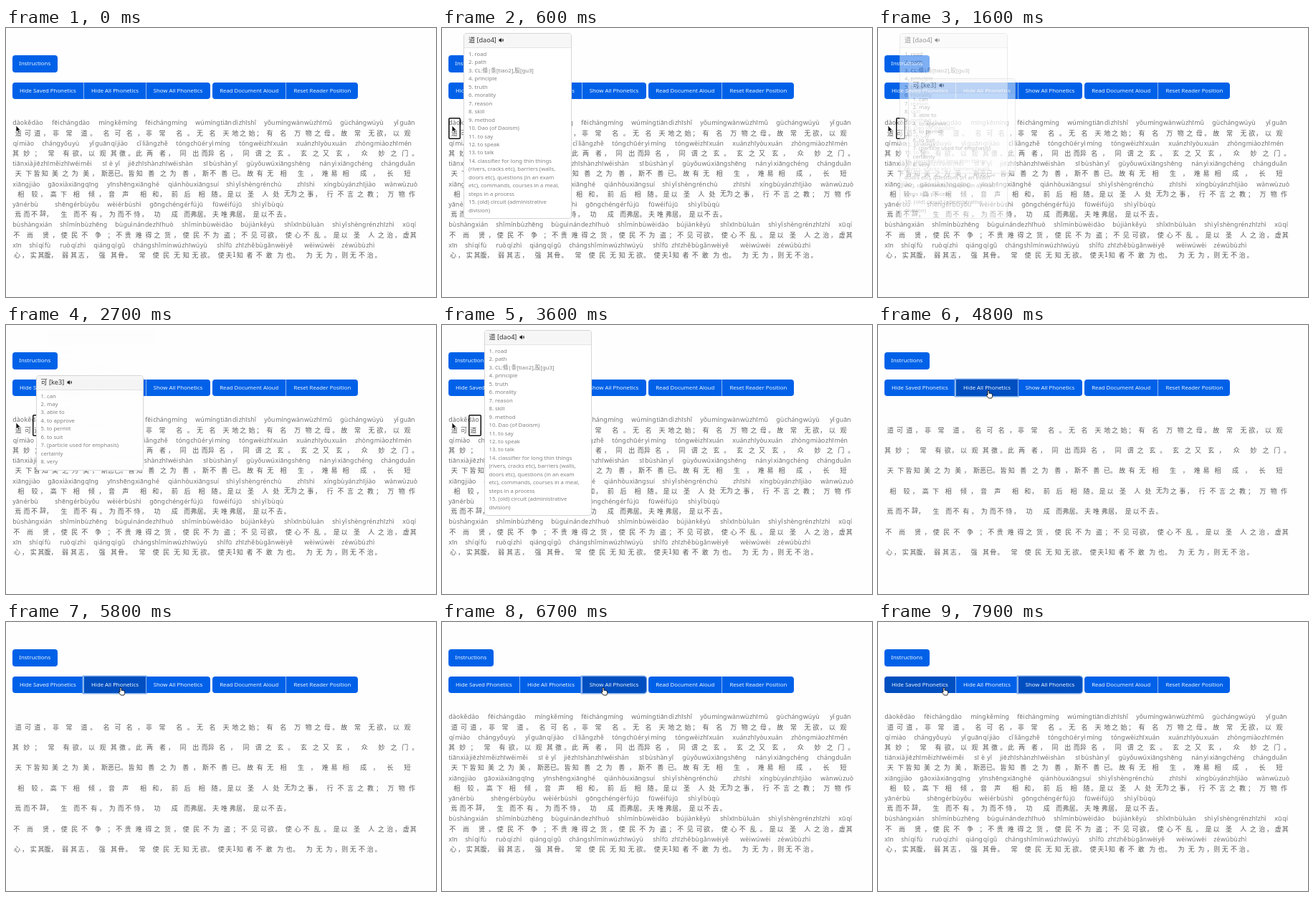
An HTML page for the animation above (8000 ms loop, 600x375 px).

```html
<!DOCTYPE html>
<html lang="zh-CN">
<head>
<meta charset="utf-8">
<title>Phonetic reader</title>
<style>
html, body { margin: 0; width: 100%; height: 100%; overflow: hidden; background: #fefefe; }
body { position: relative; font: 7.8px/1 "Noto Sans", sans-serif; color: #808080; }
#stage { position: absolute; left: 0; top: 0; width: 600px; height: 375px; overflow: hidden; }
#stage > * { position: absolute; }

.btn {
  box-sizing: border-box; top: 75.5px; height: 23.8px; line-height: 23.4px;
  text-align: center; white-space: nowrap; color: #f2f7ff; background: #0061e8;
}
.btn.first { border-radius: 4px 0 0 4px; }
.btn.last { border-radius: 0 4px 4px 0; }
.btn.next { border-left: 1px solid #8db8f5; }
#saved { animation: saved 8s step-end infinite; }
#hide { z-index: 1; animation: hide 8s step-end infinite; }
#show { z-index: 2; animation: show 8s step-end infinite; }

.phrase { display: flex; white-space: nowrap; }
.cell { box-sizing: border-box; min-width: 9px; text-align: center; }
.cell i, .cell span { display: block; height: 14.4px; line-height: 14px; }
.cell i { padding: 0 .3px; font-style: normal; font-size: 8.8px; color: #707070; animation: phonetics 8s step-end infinite; }
.cell span { font-family: "Noto Sans CJK SC", "Noto Sans CJK", "Noto Sans", sans-serif; font-size: 9px; color: #5a5a5a; }
.cell.plain span { transform: translateY(-1px); }

.mark {
  top: 125px; height: 29.5px; box-shadow: inset 0 0 0 1.5px #111; border-radius: 2px;
  opacity: 0; animation: mark 8s step-end infinite;
}
.pop {
  box-sizing: border-box; width: 150.5px; z-index: 5; overflow: hidden; background: #fff;
  border: 1px solid #d6d6d6; border-radius: 4px; opacity: 0; animation: pop 8s linear infinite;
}
.pop header {
  height: 19px; padding-left: 6px; font: 9.1px/18px "Noto Sans", "Noto Sans CJK SC", sans-serif;
  color: #333; background: #f6f6f6; border-bottom: 1px solid #e4e4e4;
}
.pop svg { width: 8px; height: 8px; margin-left: 1px; vertical-align: -1px; }
.pop pre {
  margin: 0; padding: 3px 6px 5px; font: 7.7px/11.45px "Noto Sans", "Noto Sans CJK SC", sans-serif;
}

#cursor { left: 0; top: 0; z-index: 9; width: 14px; height: 16px; overflow: visible; animation: move 8s ease-in-out infinite; }
#arrow { animation: arrow 8s step-end infinite; }
#hand { opacity: 0; animation: hand 8s step-end infinite; }

@keyframes pop { 0% { opacity: 0 } 2.5%, 15% { opacity: 1 } 17.5%, 100% { opacity: 0 } }
@keyframes mark { 0% { opacity: 1 } 15%, 100% { opacity: 0 } }
@keyframes phonetics { 0% { opacity: 1 } 58.75% { opacity: 0 } 81.25%, 100% { opacity: 1 } }
@keyframes move {
  0%, 50% { transform: translate(14px, 136px) }
  56.25%, 71.25% { transform: translate(154px, 91px) }
  77.5%, 90% { transform: translate(225px, 91px) }
  96.25%, 100% { transform: translate(92px, 91px) }
}
@keyframes arrow { 0% { opacity: 1 } 54.5%, 100% { opacity: 0 } }
@keyframes hand { 0% { opacity: 0 } 54.5%, 100% { opacity: 1 } }
@keyframes saved { 0% { background: #0061e8 } 94.6%, 100% { background: #004fc0 } }
@keyframes hide {
  0% { background: #0061e8; box-shadow: none }
  54.5% { background: #004fc0; box-shadow: none }
  58.75% { background: #004fc0; box-shadow: 0 0 0 1.5px #82aeea }
  81.25% { background: #0061e8; box-shadow: none }
  92.1% { background: #004fc0; box-shadow: none }
  94.6%, 100% { background: #0061e8; box-shadow: none }
}
@keyframes show {
  0% { background: #0061e8; box-shadow: none }
  74.7% { background: #004fc0; box-shadow: none }
  81.25%, 100% { background: #004fc0; box-shadow: 0 0 0 1.5px #82aeea }
}
</style>
</head>
<body>
<div id="stage">
  <div class="btn" style="left:8.7px;top:38px;width:63px;border-radius:4px">Instructions</div>
  <div class="btn first" id="saved" style="left:8.7px;width:99.3px">Hide Saved Phonetics</div>
  <div class="btn next" id="hide" style="left:108px;width:87px">Hide All Phonetics</div>
  <div class="btn next last" id="show" style="left:194.5px;width:90px">Show All Phonetics</div>
  <div class="btn first" style="left:287.7px;width:103px">Read Document Aloud</div>
  <div class="btn next last" style="left:390.3px;width:101px">Reset Reader Position</div>
  <svg id="cursor" viewBox="0 0 14 16">
    <path id="arrow" d="M0 0V9L2.1 7.2L3.6 10.5L5.1 9.8L3.6 6.6H6.3Z" fill="#111" stroke="#fff" stroke-width=".7"/>
    <path id="hand" d="M-1 1Q0 -1 1 1V4.4Q2 3.6 2.7 4.6Q3.7 4 4.3 5Q5.5 4.6 5.7 6V8.2L4.7 11H.3L-2.8 7Q-2.7 5.7 -1 6.8Z" fill="#fff" stroke="#111" stroke-width=".9" stroke-linejoin="round"/>
  </svg>
</div>
<script>
// One line per row; each phrase is "left characters syllables", "-" leaves a character without phonetics.
const rows = `
9 道可道， dào kě dào|64 非常道。 fēi cháng dào|129 名可名， míng kě míng|194 非常名。 fēi cháng míng|264 无名天地之始； wú míng tiān dì zhī shǐ|360 有名万物之母。 yǒu míng wàn wù zhī mǔ|466 故常无欲， gù cháng wú yù|540 以观 yǐ guān
9 其妙； qí miào|50 常有欲， cháng yǒu yù|115 以观其徼。 yǐ guān qí jiào|181 此两者， cǐ liǎng zhě|237 同出而异名， tóng chū ér yì míng|325 同谓之玄。 tóng wèi zhī xuán|405 玄之又玄， xuán zhī yòu xuán|487 众妙之门。 zhòng miào zhī mén
9 天下皆知美之为美， tiān xià jiē zhī měi zhī wéi měi|133 斯恶已。 sī è yǐ|170 皆知善之为善， jiē zhī shàn zhī wéi shàn|274 斯不善已。 sī bù shàn yǐ|335 故有无相生， gù yǒu wú xiāng shēng|437 难易相成， nán yì xiāng chéng|523 长短 cháng duǎn
9 相较， xiāng jiào|58 高下相倾， gāo xià xiāng qīng|141 音声相和， yīn shēng xiāng hé|226 前后相随。 qián hòu xiāng suí|307 是以圣人处 shì yǐ shèng rén chù|388 无为之事， - - zhī shì|443 行不言之教； xíng bù yán zhī jiào|528 万物作 wàn wù zuò
9 焉而不 yān ér bù|47 辞， -|68 生而不有。 shēng ér bù yǒu|141 为而不恃， wèi ér bù shì|200 功成而弗居。 gōng chéng ér fú jū|288 夫唯弗居， fū wéi fú jū|343 是以不去。 shì yǐ bù qù
9 不尚贤， bù shàng xián|75 使民不争； shǐ mín bù zhēng|152 不贵难得之货， bù guì nán de zhī huò|245 使民不为盗； shǐ mín bù wèi dào|327 不见可欲， bú jiàn kě yù|388 使心不乱。 shǐ xīn bù luàn|455 是以圣人之治， shì yǐ shèng rén zhī zhì|553 虚其 xū qí
9 心， xīn|32 实其腹， shí qí fù|75 弱其志， ruò qí zhì|122 强其骨。 qiáng qí gǔ|177 常使民无知无欲。 cháng shǐ mín wú zhī wú yù|294 使夫 shǐ fū|314 1 -|320 知者不敢为也。 zhī zhě bù gǎn wèi yě|416 为无为， wèi wú wèi|468 则无不治。 zé wú bù zhì`;

const road = `1. road
2. path
3. CL:條|条[tiao2],股[gu3]
4. principle
5. truth
6. morality
7. reason
8. skill
9. method
10. Dao (of Daoism)
11. to say
12. to speak
13. to talk
14. classifier for long thin things
(rivers, cracks etc), barriers (walls,
doors etc), questions (in an exam
etc), commands, courses in a meal,
steps in a process
15. (old) circuit (administrative
division)`;
const can = `1. can
2. may
3. able to
4. to approve
5. to permit
6. to suit
7. (particle used for emphasis)
certainly
8. very`;

const stage = document.getElementById("stage");
const add = html => stage.insertAdjacentHTML("beforeend", html);

function cell(char, sound) {
  const plain = sound === "-";
  return `<div class="cell${plain ? " plain" : ""}"><i>${plain || !sound ? "" : sound}</i><span>${char}</span></div>`;
}

rows.trim().split("\n").forEach((row, r) => {
  for (const phrase of row.split("|")) {
    const [left, chars, ...sounds] = phrase.split(" ");
    const cells = [...chars].map((char, i) => cell(char, sounds[i])).join("");
    add(`<div class="phrase" style="left:${left}px;top:${125.3 + 28.4 * r}px">${cells}</div>`);
  }
});

const speaker = `<svg viewBox="0 0 16 16"><path d="M1 5H4L8 2V14L4 11H1Z" fill="#222"/>
<path d="M10 5.5Q12 8 10 10.5M11.5 3.5Q15 8 11.5 12.5" fill="none" stroke="#222" stroke-width="1.5"/></svg>`;

// Each word read aloud gets a frame and a definition beside it.
function read(start, left, right, top, title, text) {
  const delay = `animation-delay:${start}s`;
  add(`<div class="mark" style="left:${left}px;width:${right - left}px;${delay}"></div>`);
  add(`<div class="pop" style="left:${right + 4}px;top:${top}px;${delay}">
    <header>${title} ${speaker}</header><pre>${text}</pre></div>`);
}
read(0.3, 8.5, 26, 7, "道 [dao4]", road);
read(1.5, 25, 37.5, 69.5, "可 [ke3]", can);
read(2.7, 36.5, 54.5, 7, "道 [dao4]", road);
</script>
</body>
</html>
```
